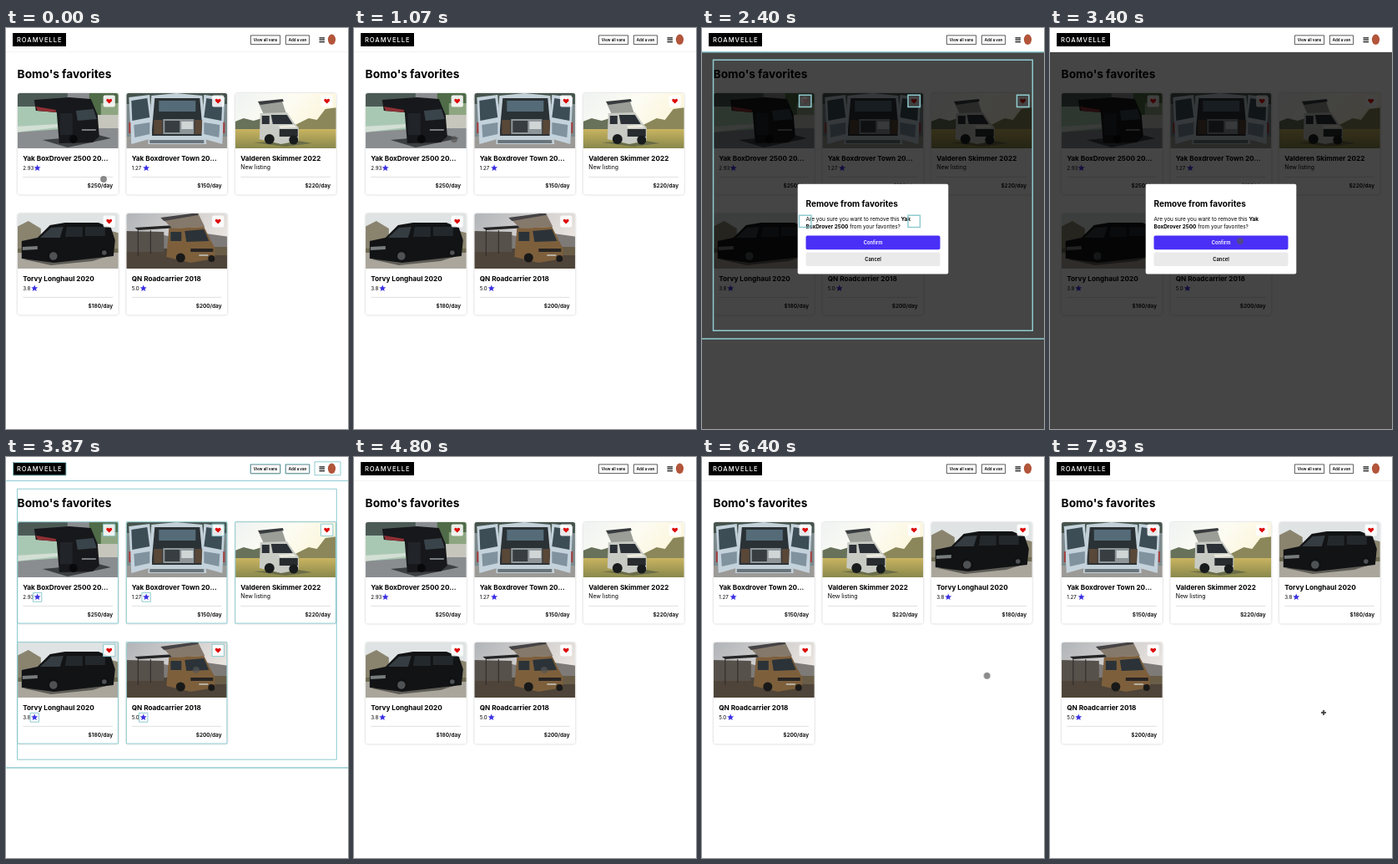
Recreate the animation shown at these times as an HTML page. Size 410 by 480 pixels, loop 8 s.

```html
<!DOCTYPE html>
<html lang="en">
<head>
<meta charset="utf-8">
<title>Favorite vans</title>
<style>
html, body { margin: 0; width: 100%; height: 100%; overflow: hidden; background: #fff; }
svg.stage { display: block; width: 410px; height: 480px; font-family: Inter, sans-serif; }
.b { font-weight: 700; }
.s { font-weight: 600; }
.card { fill: #fff; filter: drop-shadow(0 .8px 1px rgba(0, 0, 0, .24)); }
.flash { fill: none; stroke: #8fcbd0; stroke-width: 1; }
.bold { stroke-width: 1.5; }

/* All timelines share one 8 s loop. */
.before, .after, .dialog, .flash, .cursor, .dot, .cross { animation: 8s step-end infinite; }
.before { animation-name: before; }
.after { animation-name: after; }
.dialog { animation-name: dialog; }
.flash.open { animation-name: flash-open; }
.flash.close { animation-name: flash-close; }
.flash.foot { animation-name: flash-foot; }
.flash.drop { animation-name: flash-drop; }
.cursor { animation-name: move; animation-timing-function: ease-in-out; }
.dot { animation-name: dot; }
.cross { animation-name: cross; }
@keyframes before { 0% { visibility: visible } 64.1%, 100% { visibility: hidden } }
@keyframes after { 0% { visibility: hidden } 64.1%, 100% { visibility: visible } }
@keyframes dialog { 0% { visibility: hidden } 27.5% { visibility: visible } 45.8%, 100% { visibility: hidden } }
@keyframes flash-open { 0% { opacity: 0 } 27.5% { opacity: 1 } 32.5% { opacity: .6 } 34% { opacity: .3 } 35.5%, 100% { opacity: 0 } }
@keyframes flash-close { 0% { opacity: 0 } 45.8% { opacity: 1 } 54.1% { opacity: .5 } 55%, 100% { opacity: 0 } }
@keyframes flash-foot { 0% { opacity: 0 } 45.8% { opacity: 1 } 50.9% { opacity: .5 } 51.6%, 100% { opacity: 0 } }
@keyframes flash-drop { 0% { opacity: 0 } 64.1% { opacity: 1 } 67.5% { opacity: .5 } 69.1%, 100% { opacity: 0 } }
@keyframes move {
  0%, .9% { transform: translate(117px, 181px) }
  25.8%, 30.2% { transform: translate(123px, 86px) }
  37.5%, 64% { transform: translate(228px, 255px) }
  65.8%, 74.1% { transform: translate(189px, 183px) }
  83.4%, 86.6% { transform: translate(400px, 292px) }
  89.1%, 96.6% { transform: translate(336px, 306px) }
  99.1%, 100% { transform: translate(328px, 306px) }
}
@keyframes dot { 0% { visibility: visible } 86.6%, 100% { visibility: hidden } }
@keyframes cross { 0% { visibility: hidden } 86.6%, 100% { visibility: visible } }
</style>
</head>
<body>
<svg class="stage" viewBox="0 0 410 480">
  <defs>
    <linearGradient id="sun" x2="1" y2=".5">
      <stop offset="0" stop-color="#eef2f2"/><stop offset=".5" stop-color="#fdfcf3"/><stop offset="1" stop-color="#fbf3d4"/>
    </linearGradient>
    <linearGradient id="dusk" x2="1" y2=".5">
      <stop offset="0" stop-color="#aeb2b6"/><stop offset=".6" stop-color="#d6d3d2"/><stop offset="1" stop-color="#eee8e2"/>
    </linearGradient>
    <linearGradient id="grass" x2="0" y2="1">
      <stop offset="0" stop-color="#c9b460"/><stop offset="1" stop-color="#80824a"/>
    </linearGradient>
    <filter id="soft" x="0" y="0" width="1" height="1"><feGaussianBlur stdDeviation=".5"/></filter>
    <clipPath id="top"><path d="M0 66V3Q0 0 3 0H118Q121 0 121 3V66Z"/></clipPath>

    <g id="alley">
      <path fill="#8a8d90" d="M-3-3H124V69H-3Z"/>
      <path fill="#4c5a56" d="M-3-3H60V18H-3Z"/>
      <path fill="#a9c8b3" d="M-3 16H52V43L-3 47Z"/>
      <path fill="#d3dfd4" d="M-3 40 48 37V41L-3 47Z"/>
      <path fill="#4f6b48" d="M86-3H124V27H86Z"/>
      <path fill="#8ea581" d="M100 12H124V27H100Z"/>
      <path fill="#c6c6bd" d="M95 26H124V42H95Z"/>
      <path fill="#3c3f42" d="M30 56 97 50 112 54 60 65Z"/>
      <path fill="#17181b" d="M20 8 62 5 88 7 96 26 98 52 90 59 50 60 47 23 22 21Z"/>
      <path fill="#8f2f34" d="M22 16 46 20V23L24 21Z"/>
      <path fill="#39434a" d="M70 21 91 19 95 31 72 33Z"/>
      <path fill="#212428" d="M51 24H66V50H51Z"/>
      <path fill="#777c80" d="M77 43H94V45H77Z"/>
      <circle cx="67" cy="55" r="5" fill="#08090a"/>
    </g>

    <g id="camper">
      <path fill="#7d8a8c" d="M-3-3H124V69H-3Z"/>
      <path fill="#46544d" d="M-3-3H124V13H-3Z"/>
      <path fill="#9b9a96" d="M-3 52H124V69H-3Z"/>
      <path fill="#c3d0d8" d="M30 3 60 0 91 3 96 61H26Z"/>
      <path fill="#2b3236" d="M34 6H88L92 51H30Z"/>
      <path fill="#556b78" d="M39 9H83V22H39Z"/>
      <path fill="#8f969a" d="M44 31H81V49H44Z"/>
      <path fill="#d0d5d6" d="M66 34H80V43H66Z"/>
      <path fill="#594738" d="M33 32H43V49H33ZM82 32H91V49H82Z"/>
      <path fill="#383d41" d="M46 33H64V47H46Z"/>
      <path fill="#c4d2dc" d="M3 5 28 2 31 54 6 61ZM118 5 93 2 90 54 115 61Z"/>
      <path fill="#3d4d55" d="M6 9 25 6 28 29 7 33ZM115 9 96 6 93 29 114 33Z"/>
      <path fill="#7f929e" d="M9 38 28 35V49L10 53ZM112 38 93 35V49L111 53Z"/>
      <path fill="#a63b3b" d="M3 35H5V48H3ZM116 35H118V48H116Z"/>
      <path fill="#6a757b" d="M28 56H93V60H28Z"/>
    </g>

    <g id="meadow">
      <path fill="url(#sun)" d="M-3-3H124V69H-3Z"/>
      <path fill="#68715a" d="M-3 35 10 30 22 33 32 30V46H-3Z"/>
      <path fill="#8b875a" d="M72 38 88 30 98 32 108 19 124 17V46H72Z"/>
      <path fill="url(#grass)" d="M-3 43H124V69H-3Z"/>
      <path fill="#6a6d48" d="M22 59 75 57 92 60 60 64Z"/>
      <path fill="#9b9d97" d="M28 12 56 9 61 24 34 25Z"/>
      <path fill="#383c3e" d="M27 10 57 7 58 10 30 14Z"/>
      <path fill="#c8cac4" d="M30 24 62 23 71 36 76 41V57L55 61 29 55Z"/>
      <path fill="#2a3035" d="M43 26H62L69 37H45ZM32 27H41V37H32Z"/>
      <path fill="#282c2e" d="M53 43H75V52H53Z"/>
      <path fill="#eceade" d="M52 39 70 38 74 41 54 42Z"/>
      <g fill="#191c1d"><circle cx="41" cy="55" r="6"/><circle cx="70" cy="56" r="5.5"/></g>
    </g>

    <g id="road">
      <path fill="#dfe3e3" d="M-3-3H124V69H-3Z"/>
      <path fill="#8a846f" d="M-3 17 13 9 28 18V49H-3ZM99 26 108 20 124 24V44H99Z"/>
      <path fill="#aaa69c" d="M-3 46H124V69H-3Z"/>
      <path fill="#6d6a52" d="M-3 42H124V47H-3Z"/>
      <path fill="#5f5d57" d="M8 55 112 50 90 57 40 62Z"/>
      <path fill="#121315" d="M5 33 24 29 39 14 57 11H97L112 17 117 32 115 51 44 59 5 54Z"/>
      <path fill="#353d42" d="M27 29 40 17 55 16 51 29Z"/>
      <path fill="#23282c" d="M59 16H78V28H57ZM81 16H105V27H81Z"/>
      <path fill="#777c7e" d="M6 40 24 39V43L6 44Z"/>
      <g fill="#4f5254" stroke="#101112" stroke-width="2.4"><circle cx="43" cy="51" r="6"/><circle cx="104" cy="47" r="4"/></g>
    </g>

    <g id="camp">
      <path fill="url(#dusk)" d="M-3-3H124V69H-3Z"/>
      <path fill="#7d7a78" d="M-3 27 25 22 60 29 95 24 124 28V50H-3Z"/>
      <path fill="#4e4439" d="M-3 42H124V69H-3Z"/>
      <path fill="#6a5d48" d="M92 40H124V50H92Z"/>
      <path fill="#57514b" d="M-3 21 45 22V46H-3Z"/>
      <path fill="#252526" d="M10 17 58 14 64 17 14 20Z"/>
      <path stroke="#2c2a29" d="M14 20V51M29 20V48"/>
      <path fill="#85796c" d="M44 7 86 0 94 16 55 18Z"/>
      <path fill="#454345" d="M41 5 86-1V2L45 9Z"/>
      <path fill="#7d5f3c" d="M51 18 93 16 102 34 106 41V54L77 59 48 52Z"/>
      <path fill="#2b3338" d="M70 21 93 19 99 33 72 34ZM53 22H66V33H53Z"/>
      <path fill="#272523" d="M77 42H104V46H77Z"/>
      <path fill="#b4aea0" d="M87 49H98V51H87Z"/>
      <g fill="#191919"><circle cx="65" cy="53" r="5.5"/><circle cx="102" cy="54" r="4"/></g>
    </g>

    <path id="heart" fill="#dd0908" d="M0 3.1-3.1 0C-4.2-1.6-2.4-3.9 0-1.8 2.4-3.9 4.2-1.6 3.1 0Z"/>
    <path id="star" fill="#3a2fe3" d="M0-4 1.1-1.3 4-1.2 1.8.7 2.5 3.5 0 1.9-2.5 3.5-1.8.7-4-1.2-1.1-1.3Z"/>
  </defs>

  <path stroke="#f3f3f3" d="M0 28.5H410"/>
  <path d="M8 6H72V22H8Z"/>
  <text x="13" y="17" font-size="7.6" font-weight="500" letter-spacing=".95" fill="#fff">ROAMVELLE</text>
  <path fill="#fff" stroke="#333" stroke-width=".8" d="M293.4 8.9H328.6V19.6H293.4ZM335.4 8.9H363.6V19.6H335.4Z"/>
  <g class="s" font-size="4.5" text-anchor="middle">
    <text x="311" y="15.9">View all vans</text><text x="349.5" y="15.9">Add a van</text>
  </g>
  <path stroke="#111" stroke-width="1.2" d="M375.5 11.8H382M375.5 14.2H382M375.5 16.6H382"/>
  <ellipse cx="390.5" cy="13.8" rx="4.6" ry="6.2" fill="#b2553a"/>
  <text class="b" x="13.6" y="59.5" font-size="13.7">Bomo's favorites</text>

  <g class="before" id="before"></g>
  <g class="after" id="after"></g>

  <g class="dialog">
    <path fill="#000" fill-opacity=".73" d="M0 29H410V480H0Z"/>
    <rect x="114.7" y="186.7" width="180.6" height="107.8" rx="2" fill="#fff"/>
    <text class="b" x="124.5" y="213.6" font-size="10">Remove from favorites</text>
    <g font-size="6.4">
      <text x="124.5" y="230.6">Are you sure you want to remove this <tspan class="b">Yak</tspan></text>
      <text x="124.5" y="240"><tspan class="b">BoxDrover 2500</tspan> from your favorites?</text>
    </g>
    <rect x="124.5" y="248.6" width="161" height="16.6" rx="2" fill="#4a30f6"/>
    <rect x="124.5" y="268.5" width="161" height="16.6" rx="2" fill="#eaeaea"/>
    <g class="s" font-size="5.8" text-anchor="middle">
      <text x="205" y="259" fill="#fff">Confirm</text><text x="205" y="278.8">Cancel</text>
    </g>
  </g>

  <g id="flashes"></g>

  <g class="cursor">
    <circle class="dot" r="3.7" fill="#555" fill-opacity=".68" stroke="#555" stroke-opacity=".5" stroke-width=".6"/>
    <path class="cross" d="M0-3.3 1.3-1.7H.5V-.5H1.7V-1.3L3.3 0 1.7 1.3V.5H.5V1.7H1.3L0 3.3-1.3 1.7H-.5V.5H-1.7V1.3L-3.3 0-1.7-1.3V-.5H-.5V-1.7H-1.3Z"/>
  </g>
</svg>
<script>
const vans = [
  { photo: 'alley', name: 'Yak BoxDrover 2500 20…', rating: '2.93', price: 250 },
  { photo: 'camper', name: 'Yak Boxdrover Town 20…', rating: '1.27', price: 150 },
  { photo: 'meadow', name: 'Valderen Skimmer 2022', rating: '', price: 220 },
  { photo: 'road', name: 'Torvy Longhaul 2020', rating: '3.8', price: 180 },
  { photo: 'camp', name: 'QN Roadcarrier 2018', rating: '5.0', price: 200 }
];
const $ = id => document.getElementById(id);
const slot = i => [13.8 + (i % 3) * 130.5, 78 + Math.floor(i / 3) * 144];
const starX = v => v.rating.length > 3 ? 23.8 : 20.4;

function card(v, i) {
  const [x, y] = slot(i);
  const note = v.rating
    ? `<text x="6.4" y="91.9" font-size="6.2">${v.rating}</text><use href="#star" x="${starX(v)}" y="89.6"/>`
    : '<text x="6.4" y="90.8" font-size="6.9">New listing</text>';
  return `<g transform="translate(${x} ${y})">
    <rect class="card" width="121" height="121.5" rx="3"/>
    <g clip-path="url(#top)"><use href="#${v.photo}" filter="url(#soft)"/></g>
    <rect x="102.8" y="2.4" width="14.2" height="14.2" rx="2" fill="#fff" fill-opacity=".88"/>
    <use href="#heart" x="109.9" y="9.5"/>
    <text class="b" x="6.4" y="80.5" font-size="8.2">${v.name}</text>${note}
    <path stroke="#dadada" stroke-width=".8" d="M6.5 100.4H114.2"/>
    <text class="s" x="114.2" y="113.3" font-size="6.5" text-anchor="end">$${v.price}/day</text>
  </g>`;
}

const box = (x, y, w, h) => `M${x} ${y}h${w}v${h}h${-w}z`;
const flash = (name, d) => `<path class="flash ${name}" d="${d}"/>`;
const page = box(13.5, 38.2, 382.8, 324);
const hearts = list => list.map((v, i) => {
  const [x, y] = slot(i);
  return box(x + 102.7, y + 2.2, 14.4, 14.4);
}).join('');
const cards = list => list.map((v, i) => {
  const [x, y] = slot(i);
  return box(x, y - .3, 120.6, 121.4) + (v.rating ? box(x + starX(v) - 5.2, y + 84.4, 10.4, 10.8) : '');
}).join('');
const header = box(8.5, 6.5, 63.5, 15.5) + box(293, 8.5, 36, 11.5) +
  box(335, 8.5, 29, 11.5) + box(370, 5.8, 31, 16) + 'M0 28.5H410';

const rest = vans.slice(1);
$('before').innerHTML = vans.map(card).join('');
$('after').innerHTML = rest.map(card).join('');
$('flashes').innerHTML =
  flash('open bold', page + hearts(vans) + 'M0 28.7H410M0 372H410') +
  flash('close', page + cards(vans) + hearts(vans) + header) +
  flash('foot bold', 'M0 372H410') +
  flash('drop', page + cards(rest) + hearts(rest));
</script>
</body>
</html>
```
